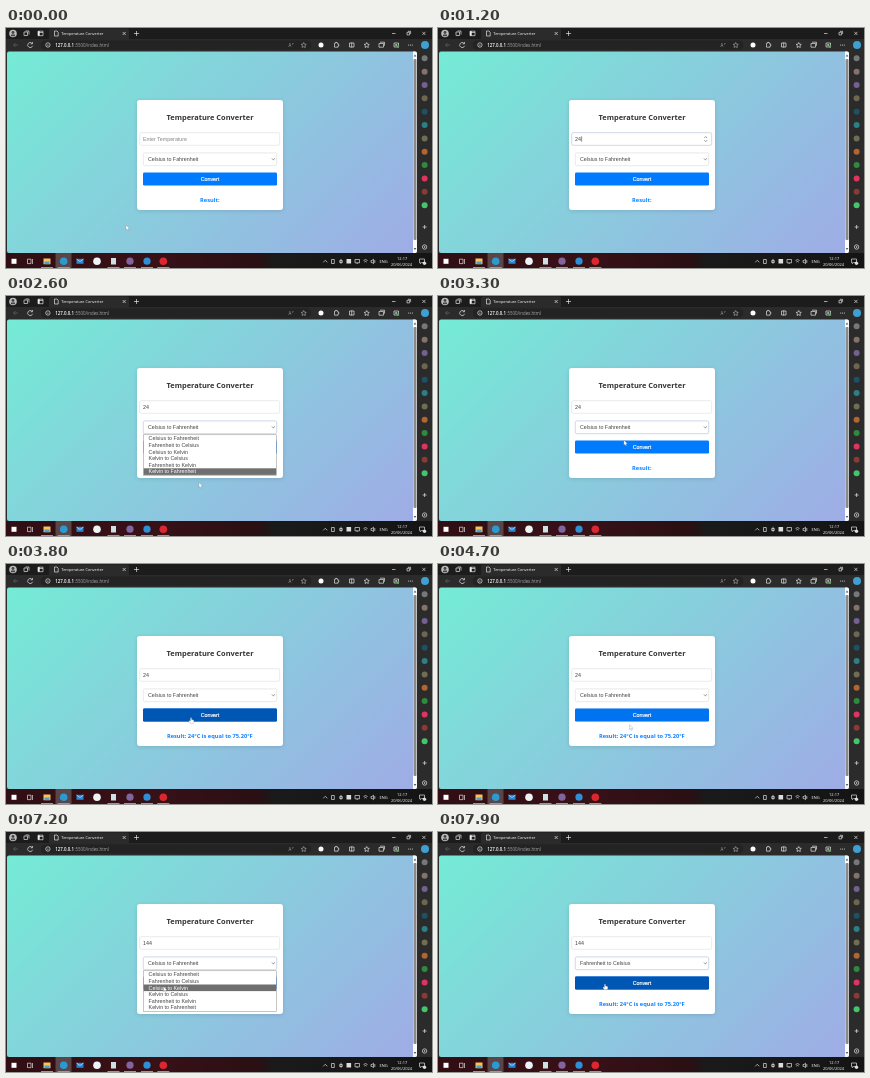
These frames come from a looping animation (426 by 240 pixels, 8 s). An HTML page:

```html
<!DOCTYPE html>
<html lang="en">
<head>
<meta charset="utf-8">
<title>Temperature Converter</title>
<style>
  html, body { margin: 0; width: 100%; height: 100%; overflow: hidden; background: #1c1c1c; }
  svg { display: block; width: 100vw; height: 100vh; }
  text { white-space: pre; }
  .ui { font-family: "Open Sans", "Noto Sans", sans-serif; }
  .field { font: 5.33px "Liberation Sans", Arial, sans-serif; }
  .line { fill: none; stroke: #eee; stroke-width: .65; }
</style>
</head>
<body>
<svg viewBox="0 0 426 240" preserveAspectRatio="none">
  <defs>
    <linearGradient id="sky" gradientUnits="userSpaceOnUse" x1="52" y1="-27" x2="356" y2="276">
      <stop stop-color="#74ebd5"/><stop offset="1" stop-color="#9face6"/>
    </linearGradient>
    <linearGradient id="taskbar">
      <stop stop-color="#300e13"/><stop offset=".35" stop-color="#381117"/>
      <stop offset=".59" stop-color="#2a0f13"/><stop offset=".63" stop-color="#1a1a1a"/>
      <stop offset="1" stop-color="#141414"/>
    </linearGradient>
    <filter id="shadow" x="-10%" y="-10%" width="120%" height="125%">
      <feDropShadow dx="0" dy="1" stdDeviation="2" flood-opacity=".12"/>
    </filter>
  </defs>

  <g id="chrome">
    <rect width="426" height="240" fill="#1c1c1c"/>
    <rect y="11" width="426" height="215" fill="#2b2b2b"/>
    <path d="M43 11.500V2.500q0-2 2-2H121q2 0 2 2V11.500Z" fill="#2b2b2b"/>
    <rect x="35" y="12.500" width="270" height="9" rx="4" fill="#232323"/>
    <rect x="1" y="23.500" width="410" height="201.500" rx="2" fill="url(#sky)"/>
    <path d="M407 23.500h2q2 0 2 2V223q0 2-2 2h-2Z" fill="#fafafa"/>
    <rect x="407.500" y="31" width="3" height="181" rx="1" fill="#898989"/>
    <path d="M407.700 28.500l1.300-2 1.300 2ZM407.700 220l1.300 2 1.300-2Z" fill="#555"/>
  </g>

  <g id="card">
    <rect x="131" y="72" width="146" height="110" rx="3" fill="#fff" filter="url(#shadow)"/>
    <text class="ui" x="204" y="92.400" font-size="7.43" font-weight="700" text-anchor="middle" fill="#333">Temperature Converter</text>
    <rect id="inputBox" x="133.700" y="104.700" width="140" height="12.600" rx="1.500" fill="#fff" stroke-width=".5"/>
    <text id="value" class="field" x="137" y="112.900"></text>
    <path id="caret" d="M143.600 108.300v5.400" stroke="#222" stroke-width=".5"/>
    <path id="spinner" class="line" style="stroke:#666" d="M266.300 110l1.400-1.400 1.400 1.400M266.300 112.200l1.400 1.400 1.400-1.400"/>
    <rect id="selectBox" x="137.300" y="124.900" width="133.400" height="12.800" rx="1.500" fill="#fff" stroke-width=".5"/>
    <text id="choice" class="field" x="142" y="133.200" fill="#444"></text>
    <path class="line" style="stroke:#444" d="M266 130.500l1.400 1.400 1.400-1.400"/>
    <rect x="137" y="144.600" width="134" height="13" rx="1.300" fill="#007bff"/>
    <rect id="hover" x="137" y="144.600" width="134" height="13" rx="1.300" fill="#0056b3"/>
    <text class="field" x="204" y="153" text-anchor="middle" fill="#fff" stroke="#fff" stroke-width=".2">Convert</text>
    <text id="result" class="ui" x="203.800" y="173.900" font-size="5.68" font-weight="700" text-anchor="middle" fill="#0c82ff"></text>
  </g>

  <g id="list">
    <rect x="137.400" y="138.800" width="133" height="40.600" fill="#fff" stroke="#8c8c8c" stroke-width=".5"/>
    <rect id="mark" x="137.700" width="132.400" height="6.600" fill="#6f6f6f"/>
  </g>

  <g id="pointer" stroke="#666" stroke-width=".25" stroke-linejoin="round">
    <path id="arrow" fill="#fff" d="M0 0V5L1.100 4 1.900 5.700 2.800 5.300 2 3.700H3.600Z"/>
    <path id="hand" fill="#fff" d="M-.6 .4Q0-.5 .6 .4V2L2.700 2.600Q3.200 4 2.400 5.800H-.8L-2.200 3.500Q-1.700 2.600-.6 3.400Z"/>
    <path id="beam" fill="none" d="M-.7-2.200H.7M0-2.200V2.200M-.7 2.200H.7"/>
  </g>
</svg>
<script>
const $ = id => document.getElementById(id);

function add(parent, tag, attrs, content = "") {
  const node = document.createElementNS("http://www.w3.org/2000/svg", tag);
  for (const key in attrs) node.setAttribute(key, attrs[key]);
  node.textContent = content;
  $(parent).append(node);
  return node;
}
const dot = (cx, cy, r, fill) => add("chrome", "circle", { cx, cy, r, fill });
const box = (x, y, width, height, fill) => add("chrome", "rect", { x, y, width, height, fill });
const line = (d, stroke = "#eee") => add("chrome", "path", { d, class: "line", style: `stroke:${stroke}` });
const label = (x, y, size, content, fill = "#fff", anchor = "start", weight = 500) =>
  add("chrome", "text", { x, y, "font-size": size, fill, "text-anchor": anchor, "font-weight": weight, class: "ui" }, content);

// Tab strip and window buttons
dot(7, 5.5, 3.8, "#bbb");
dot(7, 4.5, 1.4, "#444");
box(5, 6.5, 4, 1.7, "#444");
line("M18 4h3.500v3.500h-3.500ZM19.500 3h3.500v3.500M32 3.200h5v4.500h-5ZM32 4.500h5");
box(32, 3.2, 1.7, 4.5, "#eee");
line("M48.500 3h2.500l1.200 1.200v3.800h-3.700ZM116.700 4l3 3m0-3l-3 3M130.500 3v5M128 5.500h5");
line("M386 5.500h3.500M401 4.300h2.600v2.600h-2.600ZM402 3.300h2.600v2.600M416.300 3.800l3.200 3.200m0-3.200l-3.200 3.200");
label(55.3, 6.9, 3.87, "Temperature Converter");

// Address bar
line("M12 17H7.500m2-2l-2 2 2 2", "#666");
line("M26 15.300a2.500 2.500 0 1 0 .6 2.500M26.500 14v1.800h-1.800");
line("M39.700 17a2.200 2.200 0 1 0 4.400 0a2.200 2.200 0 1 0-4.400 0M41.900 16.500v1.600");
label(49.3, 18.5, 4.4, "127.0.0.1", "#fff", "start", 600);
label(68.4, 18.5, 4.4, ":5500/index.html", "#a5a5a5");
label(284, 18.6, 4.4, "A", "#aaa", "middle");
line("M286.500 15q1 .8 0 1.600", "#aaa");
const star = (x, color) =>
  line(`M${x} 14.500l.8 1.700 1.800.2-1.300 1.200.3 1.900-1.600-.9-1.600.9.300-1.900-1.300-1.200 1.800-.2Z`, color);
star(297.7, "#aaa");
dot(315, 17, 2.5, "#fff");
line("M328.500 15.200h1v-.8h1.500v.8h1v1.200h.8v1.500h-.8v1.300h-3.500ZM343.500 15h4.500v4h-4.500ZM345.700 14.500v5");
star(360.7);
line("M373 15.500h4.500v3.700h-4.500ZM374 14.200h4.500v3.500M388 15h4.500v4h-4.500ZM390.200 15.800v2.400m-1.200-1.200h2.400");
dot(392, 18.7, 1.2, "#4caf50");
for (const x of [402.7, 404.5, 406.3]) dot(x, 17, .5, "#eee");
dot(419, 17, 4, "#3f9fd0");

// Sidebar
["#777", "#84736a", "#75608f", "#6d6650", "#1d5165", "#2b7f85", "#6f6d52", "#b0662e", "#2f8a3e", "#dc3560", "#8a3a35", "#46c46c"]
  .forEach((fill, i) => dot(418.6, 30.3 + i * 13.35, 3, fill));
line("M418.600 197v4M416.600 199h4M416.400 219a2.200 2.200 0 1 0 4.400 0a2.200 2.200 0 1 0-4.400 0");
dot(418.6, 219, .8, "#ddd");

// Taskbar
box(0, 225, 426, 15, "url(#taskbar)");
box(49.5, 225, 16, 15, "#5a4549");
box(5.5, 230.8, 5, 5, "#fff");
line("M21.500 231.200h3.500v4.400h-3.500ZM26.500 231v5");
box(37.5, 230.5, 7, 5.7, "#f3c65a");
box(38.5, 233.5, 5, 2.7, "#4c9fd5");
dot(57.7, 233.2, 3.8, "#2a9ad0");
box(70.5, 230.8, 7, 5, "#2286d8");
line("M70.500 231l3.500 2.500 3.500-2.500");
dot(91, 233.2, 3.8, "#eef3f6");
box(105, 230, 5, 6.5, "#cfe0e4");
dot(124, 233.2, 3.6, "#80659f");
dot(141, 233.2, 3.6, "#2d8fd8");
dot(157.3, 233.2, 3.8, "#dc2630");
for (const x of [41, 57.7, 107.5, 124, 141, 157.3]) box(x - 6, 239, 12, 1, "#d77c88");
line("M317.300 234.300l2-2 2 2M325.500 231.500h2.800v4h-2.800ZM335 230.800v5M333.700 232.500h2.600v2h-2.600Z");
box(340.5, 231, 4.6, 4.5, "#ddd");
line("M349 231.500h4.500v3.300h-4.500ZM351.200 235v1M357.500 232.500a3 3 0 0 1 4 0M358.300 234a2 2 0 0 1 2.400 0");
line("M365 232.500h1l1.500-1.300v4.500l-1.500-1.300h-1ZM368.800 232v3");
label(377.5, 234.8, 4, "ENG", "#fff", "middle");
label(396.2, 231.8, 4, "12:17", "#fff", "middle");
label(395.5, 238, 4, "20/06/2024", "#fff", "middle");
line("M413.500 231h5v3.500h-3l-1.200 1.200v-1.200h-.8Z");
dot(418.5, 235.3, 1.7, "#ddd");

const options = ["Celsius to Fahrenheit", "Fahrenheit to Celsius", "Celsius to Kelvin",
  "Kelvin to Celsius", "Fahrenheit to Kelvin", "Kelvin to Fahrenheit"];
const ROW = 6.6, LIST_TOP = 139.3;
const rows = options.map((name, i) =>
  add("list", "text", { x: 142.6, y: LIST_TOP + 5.1 + i * ROW, class: "field" }, name));

const LOOP = 8000;
// Pointer stops: time, x, y
const stops = [[0, 120, 197], [100, 120, 197], [650, 160, 111], [1350, 160, 111], [1600, 205, 131],
  [1900, 205, 131], [2500, 193, 186.5], [2750, 193, 186.5], [3050, 186, 143], [3250, 186, 143],
  [3500, 185, 153.5], [4400, 185, 153.5], [5200, 205.5, 176], [5300, 205.5, 186], [5500, 205.5, 186],
  [5850, 150, 111], [6650, 150, 111], [6880, 158, 131], [6980, 158, 131], [7180, 157.5, 154.5],
  [7250, 157.5, 154.5], [7400, 158, 149], [7560, 158, 149], [7800, 167, 152]];
const events = [
  [0, { value: "", choice: 0, open: false, focus: "", typing: false, result: "" }],
  [680, { focus: "input" }],
  [900, { value: "2", typing: true }],
  [1050, { value: "24" }],
  [1400, { typing: false }],
  [1700, { focus: "select", open: true }],
  [3200, { open: false }],
  [3700, { focus: "", result: " 24°C is equal to 75.20°F" }],
  [5880, { focus: "input" }],
  [6100, { value: "2", typing: true }],
  [6200, { value: "" }],
  [6250, { value: "1" }],
  [6300, { value: "14" }],
  [6400, { value: "144" }],
  [6650, { typing: false }],
  [6930, { focus: "select", open: true }],
  [7500, { open: false, choice: 1 }]
];

const ramp = (t, from, to) => Math.min(1, Math.max(0, (t - from) / (to - from)));
const show = (id, on) => $(id).setAttribute("visibility", on ? "visible" : "hidden");

function pointerAt(t) {
  const next = stops.findIndex(stop => stop[0] > t);
  if (next < 0) return stops.at(-1).slice(1);
  const [t0, x0, y0] = stops[next - 1], [t1, x1, y1] = stops[next];
  const p = ramp(t, t0, t1), eased = p * p * (3 - 2 * p);
  return [x0 + (x1 - x0) * eased, y0 + (y1 - y0) * eased];
}

// The last option touched stays marked once the pointer leaves the list.
function markedRow(t, opened, choice) {
  let row = choice;
  for (let time = opened; time <= t; time += 20) {
    const over = Math.floor((pointerAt(time)[1] - LIST_TOP) / ROW);
    if (over >= 0 && over < options.length) row = over;
  }
  return row;
}

function draw(t) {
  const state = {};
  let opened = 0;
  for (const [time, change] of events) {
    if (time > t) break;
    Object.assign(state, change);
    if (change.open) opened = time;
  }
  const [x, y] = pointerAt(t);
  const overInput = x > 134 && x < 274 && y > 104.7 && y < 117.3;
  const overButton = !state.open && x > 137 && x < 271 && y > 144.6 && y < 157.6;

  $("value").textContent = state.value || "Enter Temperature";
  $("value").setAttribute("fill", state.value ? "#3a3a3a" : "#858585");
  $("choice").textContent = options[state.choice];
  $("result").textContent = "Result:" + state.result;
  $("inputBox").setAttribute("stroke", state.focus === "input" ? "#a5b2cc" : "#d6d6d6");
  $("selectBox").setAttribute("stroke", state.focus === "select" ? "#9db2d8" : "#d2d2d2");
  $("hover").setAttribute("opacity", ramp(t, 3450, 3650) - ramp(t, 4500, 4750) + ramp(t, 7670, 7850));
  show("spinner", overInput || state.focus === "input");
  show("caret", state.focus === "input");
  $("caret").setAttribute("transform", `translate(${(state.value.length - 2) * 2.96})`);

  $("list").style.display = state.open ? "" : "none";
  if (state.open) {
    const marked = markedRow(t, opened, state.choice);
    $("mark").setAttribute("y", LIST_TOP + marked * ROW);
    rows.forEach((row, i) => row.setAttribute("fill", i === marked ? "#fff" : "#444"));
  }

  $("pointer").setAttribute("transform", `translate(${x} ${y})`);
  show("hand", overButton);
  show("beam", overInput && !state.typing);
  show("arrow", !overButton && !overInput);
}

function frame(now) {
  draw(now % LOOP);
  requestAnimationFrame(frame);
}
draw(0);
requestAnimationFrame(frame);
</script>
</body>
</html>
```
